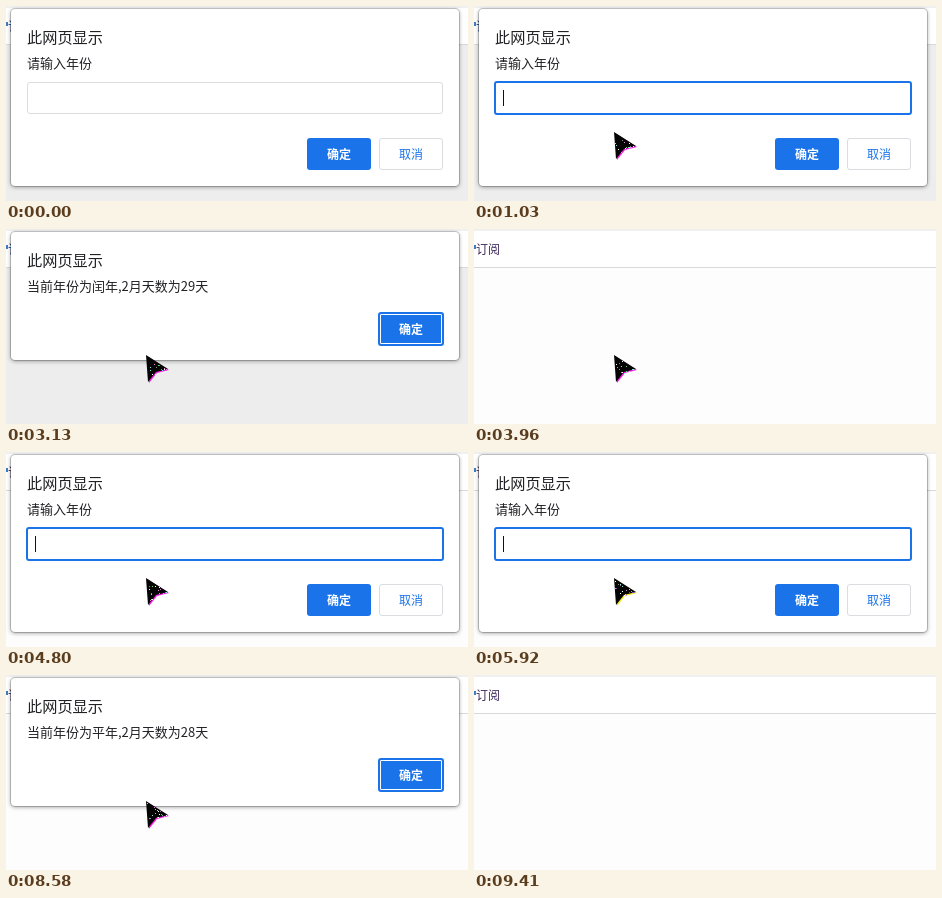
An HTML page with a canvas for the animation above (9940 ms loop, 462 px wide and 195 px high).

```html
<!DOCTYPE html>
<html lang="zh-CN">
<head>
<meta charset="utf-8">
<style>
  html, body { margin: 0; width: 100%; height: 100%; overflow: hidden; }
  body { position: relative; background: #fdfdfd; color: #202124;
    font: 13px/20px "Noto Sans CJK SC", "Noto Sans CJK", sans-serif; }
  body * { position: absolute; box-sizing: border-box; white-space: pre; }
  body.loading { background: #ededed; }

  #bar { left: 0; top: 0; width: 462px; height: 39px; background: #fff;
    border-top: 2px solid #f0f0f0; border-bottom: 1px solid #d9d9d9; }
  #link { left: 2px; top: 8px; font-size: 12px; color: #3b2858; }
  #scrap { left: 0; top: 14px; width: 2px; height: 4px; background: #3f7cc4; }
  .loading #link { color: #1c3f8c; }

  #dialog { left: 5px; top: 3px; width: 448px; height: 177px; background: #fff;
    border-radius: 4px; box-shadow: 0 0 0 1px rgba(0,0,0,.18), 0 1px 4px rgba(0,0,0,.4); }
  #dialog.alert { height: 128px; }
  #title { left: 16px; top: 17px; font-size: 15.2px; }
  #message { left: 16px; top: 44px; }
  #field { left: 16px; top: 73px; width: 416px; height: 32px;
    border: 1px solid #dadce0; border-radius: 3px; }
  .focus #field { left: 15px; top: 72px; width: 418px; height: 34px; border: 2px solid #1a73e8; }
  #value { left: 24px; top: 79px; font-family: "Open Sans", sans-serif; font-size: 12.25px; }
  #caret { left: 24px; top: 81px; width: 1px; height: 16px; background: #111; }
  .button { top: 129px; width: 64px; height: 32px; border-radius: 3px;
    font-size: 12px; line-height: 32px; text-align: center; }
  #ok { left: 296px; background: #1a73e8; color: #fff; font-weight: 700; }
  #cancel { left: 368px; border: 1px solid #dadce0; line-height: 30px; color: #1a73e8; }
  .alert #ok { left: 367px; top: 80px; width: 66px; height: 34px; line-height: 30px;
    border: 2px solid #1a73e8; box-shadow: inset 0 0 0 1px #fff; }
  .alert .prompt { display: none; }
  #pointer { left: 0; top: 0; }
</style>
</head>
<body class="loading">
<div id="bar"><span id="scrap"></span><span id="link">订阅</span></div>
<div id="dialog">
  <div id="title">此网页显示</div>
  <div id="message">请输入年份</div>
  <div id="field" class="prompt"></div>
  <div id="value" class="prompt"></div>
  <div id="caret" class="prompt"></div>
  <div id="ok" class="button">确定</div>
  <div id="cancel" class="button prompt">取消</div>
</div>
<canvas id="pointer" width="462" height="195"></canvas>
<script>
const LOOP = 9940, STEP = 70, BLINK = 530;
const $ = id => document.getElementById(id);
const dialog = $('dialog'), value = $('value'), caret = $('caret');
const ctx = $('pointer').getContext('2d');

// Each round: prompt opens, gains focus, is typed into and closes; then the answer shows.
const rounds = [
  { open: 0, focus: 560, year: '2000', keys: [1310, 1450, 1590, 1750], close: 2380,
    answer: '当前年份为闰年,2月天数为29天', show: 2450, hide: 3680 },
  { open: 4730, focus: 4730, year: '1999', keys: [6060, 6200, 6340, 6500], close: 7250,
    answer: '当前年份为平年,2月天数为28天', show: 7320, hide: 8860 }
];

// Pointer way points: time, x, y of the tip
const path = [
  [280, 290, 197], [420, 245, 125], [560, 125, 82], [700, 125, 82], [900, 140, 125],
  [8930, 140, 125], [9070, 180, 98], [9210, 205, 108], [9390, 250, 197]
];

function random(seed) {
  const s = Math.sin(seed * 12.9898) * 43758.5453;
  return s - Math.floor(s);
}

function pointerAt(t) {
  const i = path.findIndex(p => p[0] > t);
  if (i < 1) return null;
  const [t0, x0, y0] = path[i - 1], [t1, x1, y1] = path[i];
  const k = (t - t0) / (t1 - t0), e = k * k * (3 - 2 * k);
  return [x0 + (x1 - x0) * e, y0 + (y1 - y0) * e];
}

function arrow(color, dx, dy) {
  ctx.fillStyle = color;
  ctx.beginPath();
  [[0, 0], [22, 14], [10, 17], [2, 27]].forEach(([x, y]) => ctx.lineTo(x + dx, y + dy));
  ctx.fill();
}

function drawPointer(t) {
  ctx.clearRect(0, 0, 462, 195);
  const at = pointerAt(t);
  if (!at) return;
  const slot = Math.floor(t / STEP), phase = slot % 12;
  const yellow = phase < 2 || phase > 10;
  ctx.save();
  ctx.translate(Math.round(at[0]), Math.round(at[1]));
  arrow(yellow ? '#f4e51c' : '#f21ce0', 1, 2);
  arrow('#050505', 0, 1);
  const colors = ['#fff', '#7fe8e0', '#f080e8', '#8a8a8a', yellow ? '#8a3fe0' : '#57d860'];
  for (let i = 0; i < 18; i++) {
    const seed = slot * 31 + i * 3;
    const u = random(seed), v = random(seed + 1) * (1 - u);
    ctx.fillStyle = colors[i % colors.length];
    ctx.fillRect(Math.round(u * 20 + v * 3), Math.round(u * 13 + v * 23 + 2), 1, 1);
  }
  ctx.restore();
}

function render(t) {
  const r = rounds[t < rounds[1].open ? 0 : 1];
  const asking = t >= r.open && t < r.close;
  const telling = t >= r.show && t < r.hide;
  document.body.className = t < rounds[0].hide ? 'loading' : '';
  dialog.style.visibility = asking || telling ? 'visible' : 'hidden';
  dialog.className = telling ? 'alert' : t >= r.focus ? 'focus' : '';
  $('message').textContent = telling ? r.answer : '请输入年份';

  const typed = r.keys.filter(k => k <= t);
  value.textContent = r.year.slice(0, typed.length);
  const since = t - (typed.length ? typed[typed.length - 1] : r.focus);
  const lit = asking && since >= 0 && Math.floor(since / BLINK) % 2 === 0;
  caret.style.visibility = lit ? 'visible' : 'hidden';
  caret.style.left = 24 + value.offsetWidth + 'px';
  drawPointer(t);
}

const start = performance.now();
function tick() {
  render((performance.now() - start) % LOOP);
  requestAnimationFrame(tick);
}
tick();
</script>
</body>
</html>
```
